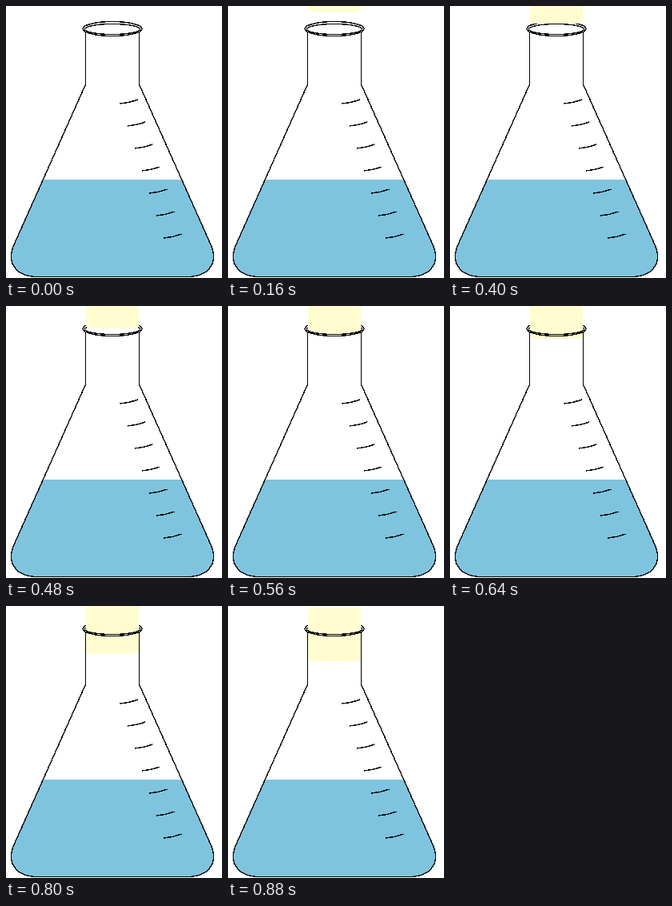
Animation of 270 by 340 pixels, one loop 0.96 s. Source, as an HTML page:

```html
<!DOCTYPE html>
<html lang="en">
<head>
<meta charset="utf-8">
<title>Flask and stopper</title>
<style>
  html, body { margin: 0; width: 100%; height: 100%; overflow: hidden; background: #fff; }
  svg { display: block; width: 270px; height: 340px; shape-rendering: crispEdges; }
  .line { fill: none; stroke: #000; stroke-width: 1.4; }
</style>
</head>
<body>
<svg viewBox="0 0 270 340">
  <path fill="#7fc4de" d="M46.5 217H220L254.5 295C260 306 261 315 258 322C253 333 242 338 226 338H40C24 338 13 333 8 322C5 315 6 306 11.5 295Z"/>
  <path class="line" d="M99.5 33V98L11.5 295C6 306 5 315 8 322C13 333 24 338.5 40 338.5H226C242 338.5 253 333 258 322C261 315 260 306 254.5 295L166.5 98V33"/>
  <g id="ticks" class="line"></g>
  <path class="line" d="M96 28.5A37 9 0 0 1 170 28.5M98.5 29A34.5 6.5 0 0 1 167.5 29"/>
  <rect id="cork" x="100" width="66" height="67" rx="5" fill="#fffdd0"/>
  <path class="line" d="M96 28.5A37 9 0 0 0 170 28.5M98.5 29A34.5 6.5 0 0 0 167.5 29"/>
</svg>
<script>
  const STEP = 80, STEPS = 12, HEIGHT = 67;
  const [ticks, cork] = ['ticks', 'cork'].map(id => document.getElementById(id));

  for (let i = 0; i < 7; i++) {
    const tick = document.createElementNS('http://www.w3.org/2000/svg', 'path');
    tick.setAttribute('d', `M${142.5 + 9.1 * i} ${122 + 28 * i}q12 -1 22.5 -5`);
    ticks.append(tick);
  }

  // Lower edge of the stopper: it speeds up as it enters the neck.
  function corkBottom(step) {
    if (step === 0) return 0;
    if (step <= 5) return 5 * step - 3;
    if (step <= 8) return Math.round(22 + 6.4 * (step - 5));
    return 69 - 9 * (11 - step);
  }

  function draw(now) {
    const step = Math.floor(now / STEP) % STEPS;
    cork.setAttribute('y', corkBottom(step) - HEIGHT);
    requestAnimationFrame(draw);
  }
  draw(0);
</script>
</body>
</html>
```
